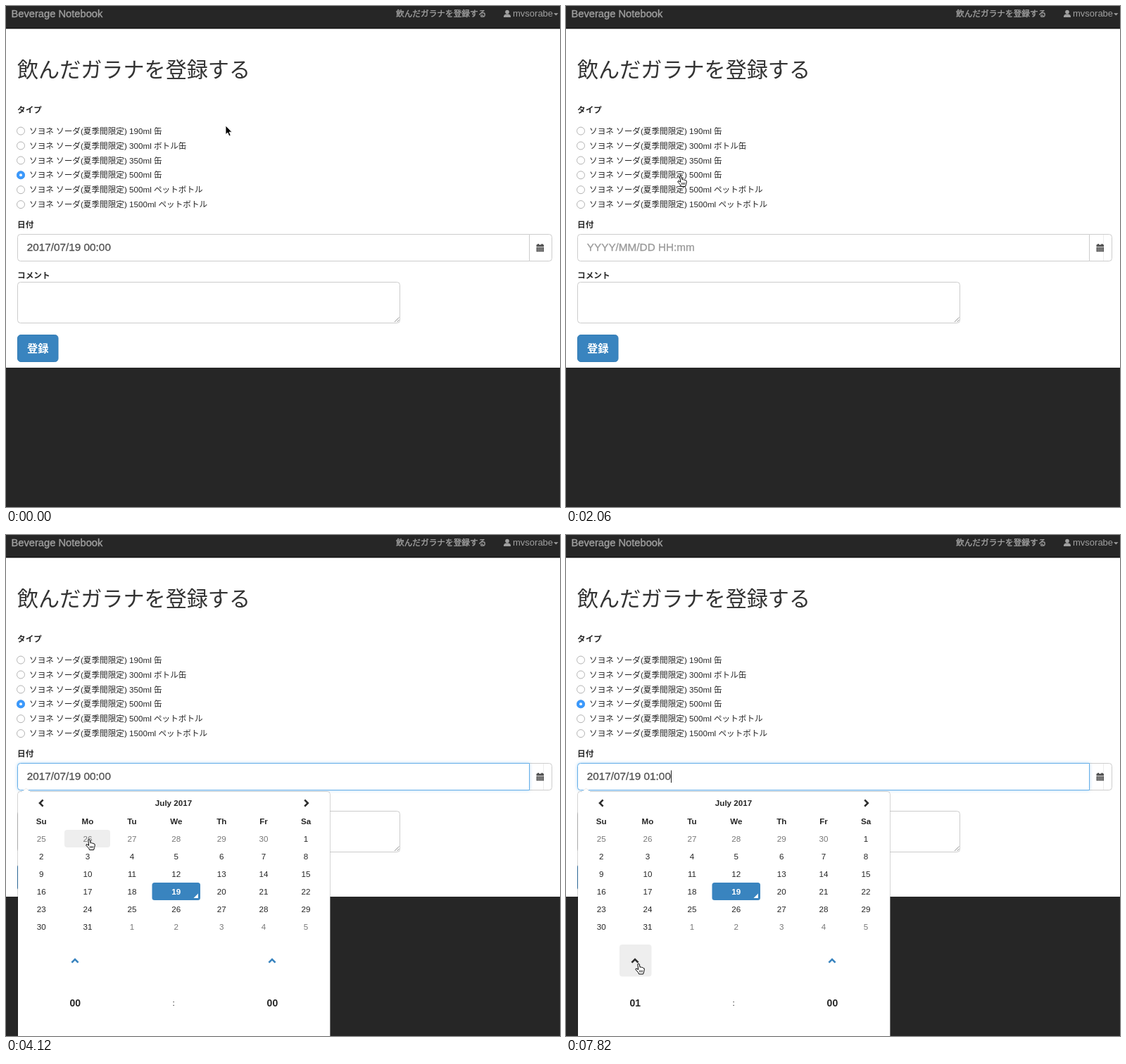
An HTML page that plays this animation: 787 px wide and 712 px high, repeating every 8000 ms.

```html
<!DOCTYPE html>
<html lang="ja">
<head>
<meta charset="utf-8">
<title>登録フォーム</title>
<style>
html, body { margin: 0; width: 100%; height: 100%; overflow: hidden; background: #262626; }
svg { display: block; width: 787px; height: 712px; font: 11.63px "Liberation Sans", "Noto Sans CJK JP", "Noto Sans CJK", sans-serif; fill: #262626; }
text { white-space: pre; }
.b { font-weight: bold; }
.mid { text-anchor: middle; }
.nav { fill: #a0a0a0; }
.nav .strong { stroke: #a0a0a0; stroke-width: .35; }
.big { font-size: 15.3px; }
.box { fill: #fff; stroke: #ccc; }
.mute { fill: #777; }
.blue { fill: #3984bf; }
.chev { fill: none; stroke: #2e2e2e; stroke-width: 2.6; }
.chev.up { stroke: #3984bf; }
#value { fill: #999; stroke: #999; stroke-width: .3; }
#value.filled { fill: #505050; stroke: #505050; }
#field.focus { stroke: #66afe9; filter: drop-shadow(0 0 2px rgba(102, 175, 233, .5)); }
</style>
</head>
<body>
<svg viewBox="0 0 787 712">
  <rect width="787" height="712" fill="#262626"/>
  <rect y="31" width="787" height="2" fill="#0e0e0e"/>
  <rect y="32.4" width="787" height="481.6" fill="#fff"/>

  <g class="nav">
    <text class="strong" x="7.5" y="16" font-size="14.7">Beverage Notebook</text>
    <text class="strong" x="554" y="15" font-weight="500" font-size="11.68">飲んだガラナを登録する</text>
    <circle cx="712" cy="8.6" r="2.8"/>
    <path d="M707 16V14.3Q707.4 12.4 710.3 11.6H713.7Q716.6 12.4 717 14.3V16Z"/>
    <text x="720" y="15.3" font-size="13">mvsorabe</text>
    <path d="M778 10.2H784.6L781.3 13.6Z"/>
  </g>

  <text x="16" y="101" font-size="30.1" fill="#333">飲んだガラナを登録する</text>
  <text class="b" x="16" y="151.8">タイプ</text>
  <g id="radios"></g>

  <text class="b" x="16" y="315">日付</text>
  <path class="box" d="M743.5 324.5H771.5Q775.5 324.5 775.5 328.5V358.5Q775.5 362.5 771.5 362.5H743.5Z"/>
  <rect id="shade" x="744" y="325" width="20.5" height="37" fill="#efefef"/>
  <path id="seam" d="M763.5 325V362" stroke="#ececec"/>
  <g fill="#505050">
    <path d="M753.5 339.2H764V342H753.5ZM755 338H757V340H755ZM760.5 338H762.5V340H760.5Z"/>
    <path d="M753.5 342.8H764V349.2H753.5Z"/>
    <path d="M754 345H763.5M754 347.2H763.5M756.2 343V349M758.8 343V349M761.4 343V349" stroke="#aaa" stroke-width=".6"/>
  </g>
  <path id="field" class="box" d="M20.5 324.5H743.5V362.5H20.5Q16.5 362.5 16.5 358.5V328.5Q16.5 324.5 20.5 324.5Z"/>
  <text id="value" class="big" x="29.8" y="348.4"></text>
  <path id="caret" d="M0 334.5V352" stroke="#222"/>

  <text class="b" x="16" y="387">コメント</text>
  <rect class="box" x="16.5" y="392.5" width="543" height="58" rx="4"/>
  <path d="M552 449L558.5 442.5M555.5 449L558.5 446" stroke="#888" stroke-width=".9"/>
  <rect class="blue" x="16.5" y="467.5" width="57.5" height="38" rx="4.5" stroke="#347cb4"/>
  <text class="b big mid" x="45.2" y="491.5" fill="#fff">登録</text>

  <g id="picker">
    <rect x="17" y="365" width="443.5" height="360" rx="4" fill="#fff"/>
    <rect x="16.5" y="364.5" width="444" height="360" rx="4" fill="none" stroke="rgba(0,0,0,.17)"/>
    <path d="M22.5 365L28.5 360L34.5 365" fill="#fff" stroke="#ddd" stroke-width=".8"/>
    <path d="M23 364H34V366H23Z" fill="#fff"/>
    <path class="chev" d="M52.6 376.4L48 381L52.6 385.6M424.2 376.4L428.8 381L424.2 385.6"/>
    <text class="b mid" x="238" y="385.2">July 2017</text>
    <rect id="hover" height="25" rx="4" fill="#eee"/>
    <g id="days"></g>
    <rect id="hourBox" x="76" y="582" width="45.5" height="45.5" rx="4" fill="#eee"/>
    <path id="hourUp" class="chev up" d="M93.4 607.6L98 603L102.6 607.6"/>
    <path class="chev up" d="M373.4 607.6L378 603L382.6 607.6"/>
    <g class="b mid" font-size="14">
      <text id="hour" x="98.2" y="670"></text>
      <text x="378.4" y="670">00</text>
    </g>
    <text class="mid" x="238" y="669" fill="#111">:</text>
  </g>

  <g id="arrow">
    <path d="M0 0V12.6L2.9 10L4.9 14.8L7.2 13.8L5.2 9.2H9Z" fill="#000" stroke="#fff" stroke-width=".9"/>
  </g>
  <g id="hand">
    <path d="M-1.2 1.4Q0 -.2 1.3 1.4L2 5.8Q3.6 4.8 4.6 6.2Q6.1 5.4 6.8 7Q8.4 6.7 8.3 8.6L7.6 12.4L6.6 15.5H.6L-.4 13.2L-4 9.3Q-4.5 7.6-3 7.5L-.3 9.3Z" fill="#fff" stroke="#000"/>
    <path d="M1.6 10V13M3.5 10V13M5.4 10V13" stroke="#000" stroke-width=".8"/>
  </g>
  <g id="beam" fill="none">
    <path d="M-3 .5Q0 .5 0 2.5V12.5Q0 14.5-3 14.5M3 .5Q0 .5 0 2.5M0 12.5Q0 14.5 3 14.5M-2 9.5H2" stroke="#fff" stroke-width="2.4" opacity=".7"/>
    <path d="M-3 .5Q0 .5 0 2.5V12.5Q0 14.5-3 14.5M3 .5Q0 .5 0 2.5M0 12.5Q0 14.5 3 14.5M-2 9.5H2" stroke="#111"/>
  </g>
</svg>
<script>
const LOOP = 8000;
const $ = id => document.getElementById(id);
const show = (id, on) => { $(id).style.display = on ? '' : 'none'; };
const between = (t, a, b) => t >= a && t < b;

function add(parent, tag, attrs, text = '') {
  const el = document.createElementNS('http://www.w3.org/2000/svg', tag);
  for (const k in attrs) el.setAttribute(k, attrs[k]);
  el.textContent = text;
  return $(parent).appendChild(el);
}

// Drink choices
const CHOSEN = 3;
['190ml 缶', '300ml ボトル缶', '350ml 缶', '500ml 缶', '500ml ペットボトル', '1500ml ペットボトル'].forEach((size, i) => {
  const y = 177.6 + 20.9 * i;
  add('radios', 'circle', { cx: 21, cy: y, r: 5.5, fill: '#fff', stroke: '#b4b4b4' });
  if (i === CHOSEN) {
    add('radios', 'g', { id: 'dot' });
    add('dot', 'circle', { cx: 21, cy: y, r: 6, fill: '#3b99fc' });
    add('dot', 'circle', { cx: 21, cy: y, r: 2, fill: '#fff' });
  }
  add('radios', 'text', { x: 33, y: y + 4.1 }, `ソヨネ ソーダ(夏季間限定) ${size}`);
});

// Calendar
const EDGES = [17, 83, 148, 208, 276, 336, 396, 456];
const CENTERS = [50.3, 116, 179, 241.8, 306.3, 366, 426];
const TOP = 419, ROW = 25.1;
'Su Mo Tu We Th Fr Sa'.split(' ').forEach((name, c) =>
  add('days', 'text', { class: 'b mid', x: CENTERS[c], y: 410.5 }, name));
for (let i = 0; i < 42; i++) {
  const c = i % 7, y = TOP + ROW * Math.floor(i / 7);
  const day = i < 6 ? 25 + i : i < 37 ? i - 5 : i - 36;
  const today = day === 19;
  if (today) {
    add('days', 'rect', { class: 'blue', x: 207.5, y: y - 0.3, width: 68.5, height: 25, rx: 3.5 });
    add('days', 'path', { d: 'M273 509.5V516H266.5Z', fill: '#fff' });
  }
  const look = today ? 'b' : i < 6 || i > 36 ? 'mute' : '';
  const label = add('days', 'text', { class: `mid ${look}`, x: CENTERS[c], y: y + 16.7 }, day);
  if (today) label.setAttribute('fill', '#fff');
}

// Pointer: time, x, y, shape
const POINTER = [
  [0, 312, 170, 'arrow'], [890, 298, 172, 'arrow'], [1040, 288, 177, 'arrow'],
  [1180, 268, 187, 'arrow'], [1330, 241, 201, 'hand'], [1470, 216, 214, 'hand'],
  [1620, 195, 225, 'hand'], [1770, 179, 233, 'hand'], [1910, 169, 239, 'hand'],
  [2060, 163, 241, 'hand'], [2660, 148, 274, 'hand'], [2800, 125, 318, 'arrow'],
  [2950, 115, 338, 'beam'], [3830, 115, 366, 'arrow'], [3980, 116, 398, 'arrow'],
  [4120, 118, 432, 'hand'], [4270, 121, 466, 'hand'], [4420, 123, 495, 'hand'],
  [4710, 126, 548, 'hand'], [4850, 126, 597, 'arrow'], [5000, 122.5, 626, 'arrow'],
  [5150, 109, 614, 'hand'], [5300, 103, 608.5, 'hand']
];
const BLINK = [[3240, 3830, 111.5], [5740, 6340, 149.5], [6780, 7230, 149.5], [7820, LOOP, 149.5]];

function draw(t) {
  const [, x, y, shape] = POINTER.findLast(p => p[0] <= t);
  for (const id of ['arrow', 'hand', 'beam']) show(id, id === shape);
  $(shape).setAttribute('transform', `translate(${x} ${y})`);

  const open = t >= 3240;
  const filled = t < 140 || open;
  const hour = t < 5740 ? '00' : '01';
  show('dot', t < 140 || t >= 2360);
  show('picker', open);
  show('seam', t >= 140);
  show('shade', between(t, 590, 1040));
  $('value').textContent = filled ? `2017/07/19 ${hour}:00` : 'YYYY/MM/DD HH:mm';
  $('value').classList.toggle('filled', filled);
  $('hour').textContent = hour;
  $('field').classList.toggle('focus', t >= 3390);

  const blink = BLINK.find(b => between(t, b[0], b[1]));
  show('caret', blink);
  if (blink) $('caret').setAttribute('transform', `translate(${blink[2]} 0)`);

  const row = Math.floor((y - TOP) / ROW);
  const overDay = open && row >= 0 && row < 6;
  show('hover', overDay);
  if (overDay) {
    const c = EDGES.findLastIndex(e => e <= x);
    $('hover').setAttribute('x', EDGES[c]);
    $('hover').setAttribute('y', TOP + ROW * row);
    $('hover').setAttribute('width', EDGES[c + 1] - EDGES[c]);
  }
  const overHour = t >= 5150;
  show('hourBox', overHour);
  $('hourUp').classList.toggle('up', !overHour);
}

const start = performance.now();
function tick() {
  draw((performance.now() - start) % LOOP);
  requestAnimationFrame(tick);
}
tick();
</script>
</body>
</html>
```
